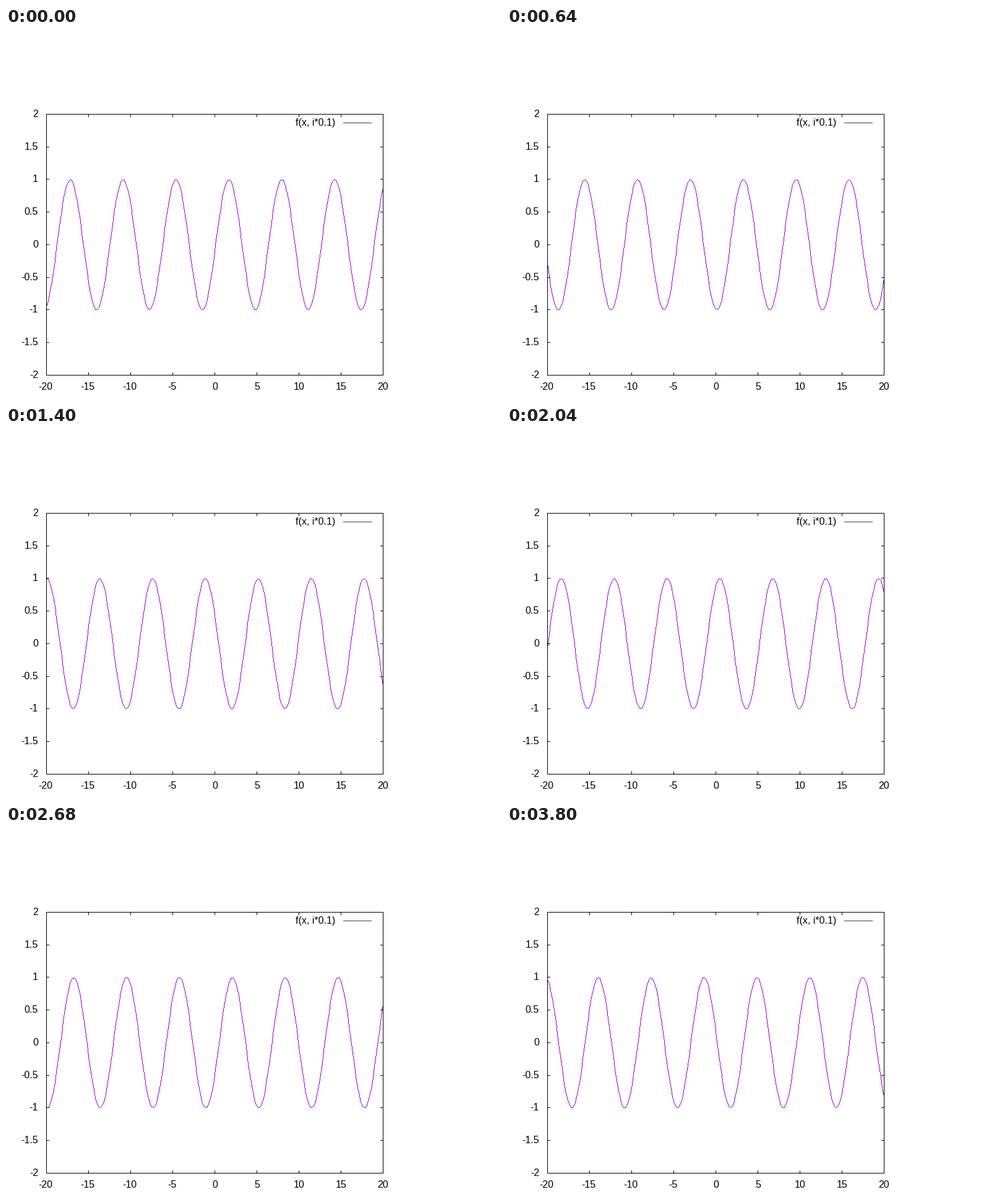
Recreate the animation shown at these times as a matplotlib script. Size 800x600 px, loop 3840 ms.

```python
import numpy as np
import matplotlib.pyplot as plt
from matplotlib.animation import FuncAnimation

W, H, DPI = 800, 600, 100
LEFT, RIGHT, TOP, BOTTOM = 65, 609, 139, 561
FRAMES, INTERVAL = 96, 40
SAMPLES = 200
TICK = 4
FONT_PX = 16

BLACK = (0, 0, 0)
PURPLE = (148, 0, 211)
GREY = (64, 64, 64)


def col(x):
    return np.floor(LEFT + (x + 20) * (RIGHT - LEFT) / 40 + 0.5).astype(int)


def row(y):
    return BOTTOM - np.floor((y + 2) * (BOTTOM - TOP) / 4 + 0.5).astype(int)


def line(img, x0, y0, x1, y1, color):
    """Draw a one-pixel line without antialiasing."""
    n = max(abs(x1 - x0), abs(y1 - y0)) + 1
    xs = np.floor(np.linspace(x0, x1, n) + 0.5).astype(int)
    ys = np.floor(np.linspace(y0, y1, n) + 0.5).astype(int)
    img[ys, xs] = color


def draw_axes(img):
    for x in (LEFT, RIGHT):
        line(img, x, TOP, x, BOTTOM, BLACK)
    for y in (TOP, BOTTOM):
        line(img, LEFT, y, RIGHT, y, BLACK)
    for x in col(X_TICKS):
        line(img, x, TOP, x, TOP + TICK, BLACK)
        line(img, x, BOTTOM - TICK, x, BOTTOM, BLACK)
    for y in row(Y_TICKS):
        line(img, LEFT, y, LEFT + TICK, y, BLACK)
        line(img, RIGHT - TICK, y, RIGHT, y, BLACK)
    line(img, 545, 153, 590, 153, GREY)


def render(i):
    img = np.full((H, W, 3), 255, np.uint8)
    x = np.linspace(-20, 20, SAMPLES)
    cols, rows = col(x), row(np.sin(x - 0.1 * (i + 1)))
    for k in range(SAMPLES - 1):
        line(img, cols[k], rows[k], cols[k + 1], rows[k + 1], PURPLE)
    draw_axes(img)
    return img


def label(x, baseline, text, ha):
    ax.text(x, baseline, text, ha=ha, va="baseline", color="black",
            family="Liberation Sans", fontsize=FONT_PX * 72 / DPI)


X_TICKS = np.arange(-20, 21, 5)
Y_TICKS = np.arange(-2, 2.1, 0.5)

fig = plt.figure(figsize=(W / DPI, H / DPI), dpi=DPI, facecolor="white")
ax = fig.add_axes([0, 0, 1, 1])
ax.axis("off")
picture = ax.imshow(render(0), extent=(0, W, H, 0), aspect="auto",
                    interpolation="nearest")

for v in X_TICKS:
    label(col(v) + (-1 if v < 0 else 0.5), 585, f"{v:g}", "center")
for v in Y_TICKS:
    label(52, row(v) + 5, f"{v:g}", "right")
label(468, 158, "f(x, i*0.1)", "left")


def update(i):
    picture.set_data(render(i))
    return (picture,)


anim = FuncAnimation(fig, update, frames=FRAMES, interval=INTERVAL,
                     repeat=True, repeat_delay=0)
plt.show()
```
